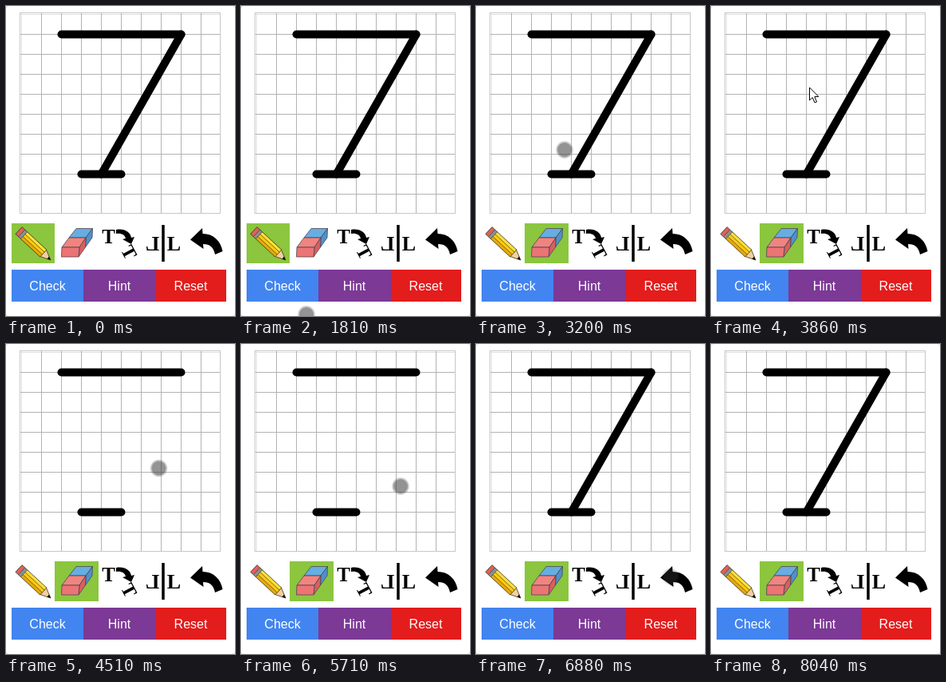
Recreate the animation shown at these times as an HTML page with a canvas. Size 287 by 388 pixels, loop 9170 ms.

```html
<!DOCTYPE html>
<html lang="en">
<head>
<meta charset="utf-8">
<title>Letter drawing pad</title>
<style>
html, body { margin: 0; width: 100%; height: 100%; overflow: hidden; background: #fff; }
canvas { display: block; width: 287px; height: 388px; }
</style>
</head>
<body>
<canvas id="pad" width="287" height="388"></canvas>
<script>
const ctx = document.getElementById('pad').getContext('2d');
const LOOP = 9170;
const GREEN = '#8bc63e';

// Pointer keys: time, x, y, kind
const POINTER = [
  [0, 0, 0, ''],
  [1810, 82, 386, 'dot'], [1930, 83, 340, 'dot'], [2050, 84.5, 301, 'dot'],
  [2300, 89, 300.5, 'dot'],
  [3080, 97, 255, 'dot'], [3200, 111, 180, 'dot'], [3320, 122, 121, 'dot'],
  [3470, 122, 101.5, 'dot'], [3610, 121, 101, 'dot'],
  [3860, 123.5, 102, 'arrow'], [3980, 148, 121, 'arrow'],
  [4100, 177, 143, 'arrow'], [4220, 191, 154, 'arrow'],
  [4510, 191.5, 155.5, 'dot'],
  [5710, 200, 178, 'dot'], [5830, 217, 222, 'dot'], [5950, 235, 268, 'dot'],
  [6070, 244, 291, 'faint'],
  [7800, 247, 320, 'faint'], [7920, 253, 375, 'faint'],
  [8040, 0, 0, '']
];

function poly(points, fill, stroke, width = 1) {
  ctx.beginPath();
  points.forEach(([x, y]) => ctx.lineTo(x, y));
  ctx.closePath();
  if (fill) { ctx.fillStyle = fill; ctx.fill(); }
  if (stroke) { ctx.strokeStyle = stroke; ctx.lineWidth = width; ctx.stroke(); }
}

function line(x1, y1, x2, y2, color, width) {
  ctx.strokeStyle = color;
  ctx.lineWidth = width;
  ctx.beginPath();
  ctx.moveTo(x1, y1);
  ctx.lineTo(x2, y2);
  ctx.stroke();
}

function shape(path, fill) {
  ctx.fillStyle = fill;
  ctx.fill(new Path2D(path));
}

function placed(x, y, draw, angle = 0, flip = 1) {
  ctx.save();
  ctx.translate(x, y);
  ctx.rotate(angle);
  ctx.scale(flip, 1);
  draw();
  ctx.restore();
}

function glyph(char, size) {
  ctx.font = `bold ${size}px "Liberation Serif", serif`;
  ctx.textAlign = 'center';
  ctx.fillStyle = '#000';
  ctx.fillText(char, 0, 0);
}

function board() {
  ctx.fillStyle = '#efefef';
  ctx.fillRect(0, 0, 287, 388);
  ctx.fillStyle = '#fff';
  ctx.beginPath();
  ctx.roundRect(0, 0, 287, 388, 5);
  ctx.fill();
  for (let i = 0; i < 10; i++) {
    const x = 19.5 + 25 * i, y = 10.5 + 25 * i;
    const color = i ? '#b3b3b3' : '#e0e0e0';
    line(x, 9, x, 259, color, 1);
    line(18, y, 268, y, color, 1);
  }
  ctx.strokeStyle = '#c8c8c8';
  ctx.strokeRect(17.5, 8.5, 251, 251);
}

function strokes(diagonal) {
  ctx.lineCap = 'round';
  line(69.5, 35.5, 219.5, 35.5, '#000', 10);
  line(94.5, 210.5, 144.5, 210.5, '#000', 10);
  if (diagonal) line(219.5, 35.5, 119.5, 210.5, '#000', 10);
  ctx.lineCap = 'butt';
}

function highlight(index) {
  const left = Math.floor(7 + 54.5 * index);
  const right = Math.floor(7 + 54.5 * (index + 1));
  ctx.fillStyle = GREEN;
  ctx.fillRect(left, 272, right - left, 50);
}

function pencil() {
  placed(16, 281, () => {
    const bar = (x, y, w, h, color) => {
      ctx.fillStyle = color;
      ctx.fillRect(x, y, w, h);
    };
    poly([[41, -6], [54.5, 0], [41, 6]], '#f3cfa0', '#4a3c20', 0.8);
    poly([[50, -2], [54.5, 0], [50, 2]], '#111');
    bar(0, -6, 5, 12, '#e0605c');
    bar(5, -6, 4, 12, '#8b9092');
    bar(9, -6, 33, 4, '#ffdf3a');
    bar(9, -2, 33, 4, '#fccb12');
    bar(9, 2, 33, 4, '#e7a90c');
    line(9, -2, 42, -2, '#6b5412', 0.8);
    line(9, 2, 42, 2, '#6b5412', 0.8);
    ctx.strokeStyle = '#40371c';
    ctx.strokeRect(0, -6, 42, 12);
    line(5, -6, 5, 6, '#444', 0.8);
    line(9, -6, 9, 6, '#444', 0.8);
  }, 0.747);
}

function eraser() {
  const edge = '#4c4650';
  poly([[79, 290], [88, 278.5], [108.5, 278.5], [100, 290]], '#67ade2', edge, 0.8);
  poly([[100, 290], [108.5, 278.5], [108, 290], [99.5, 302]], '#4f91cc', edge, 0.8);
  poly([[70, 302], [79, 290], [100, 290], [92, 302]], '#f18480', edge, 0.8);
  poly([[92, 302], [100, 290], [99.5, 302], [91, 314]], '#d95f5f', edge, 0.8);
  poly([[70, 302], [92, 302], [91, 314], [69.5, 314]], '#ec7474', edge, 0.8);
}

function icons() {
  pencil();
  eraser();
  placed(128.5, 296.5, () => glyph('T', 25));
  placed(147, 312, () => glyph('T', 24), 1.08);
  shape('M138 280 C148 278 156 283 157 290 L161 289 L157 298 L146 292 L150 291 C149 286 144 284 138 285Z', '#000');
  line(197, 274, 197, 320, '#000', 3.5);
  placed(210.5, 306, () => glyph('L', 26));
  placed(183.5, 306, () => glyph('L', 26), 0, -1);
  shape('M231 292.5 L246 278 L246.5 285 C260 285 269 294 271.5 307 L262 311 C260 302 256 298 247 298 L247.5 304Z', '#000');
}

function buttons() {
  const items = [
    ['Check', 7, 90, '#4285f0', 52],
    ['Hint', 97, 91, '#7c3996', 142],
    ['Reset', 188, 88, '#e31c1c', 231.5]
  ];
  ctx.font = '16px "Liberation Sans", Arial, sans-serif';
  ctx.textAlign = 'center';
  for (const [label, x, width, color, middle] of items) {
    ctx.fillStyle = color;
    ctx.fillRect(x, 330, width, 40);
    ctx.fillStyle = '#fff';
    ctx.fillText(label, middle, 356);
  }
}

function disc(radius, color) {
  ctx.fillStyle = color;
  ctx.beginPath();
  ctx.arc(0, 0, radius, 0, Math.PI * 2);
  ctx.fill();
}

function pointer(t) {
  const [, x, y, kind] = POINTER.findLast(key => key[0] <= t);
  if (!kind) return;
  placed(x, y, () => {
    if (kind === 'arrow') {
      poly([[0, 0], [0, 16], [3.7, 12.5], [6.5, 19], [9, 18], [6.3, 11.6], [11.3, 11.4]], '#fff', '#000', 1);
      return;
    }
    ctx.globalAlpha = kind === 'faint' ? 0.45 : 1;
    disc(10.7, 'rgba(70,70,70,.28)');
    disc(9, 'rgba(70,70,70,.42)');
  });
}

function render(t) {
  board();
  strokes(t < 4510 || t >= 6880);
  highlight(t < 2580 ? 0 : 1);
  if (t >= 6730 && t < 6880) highlight(4);
  icons();
  buttons();
  pointer(t);
}

const start = performance.now();
function tick() {
  render((performance.now() - start) % LOOP);
  requestAnimationFrame(tick);
}
tick();
</script>
</body>
</html>
```
